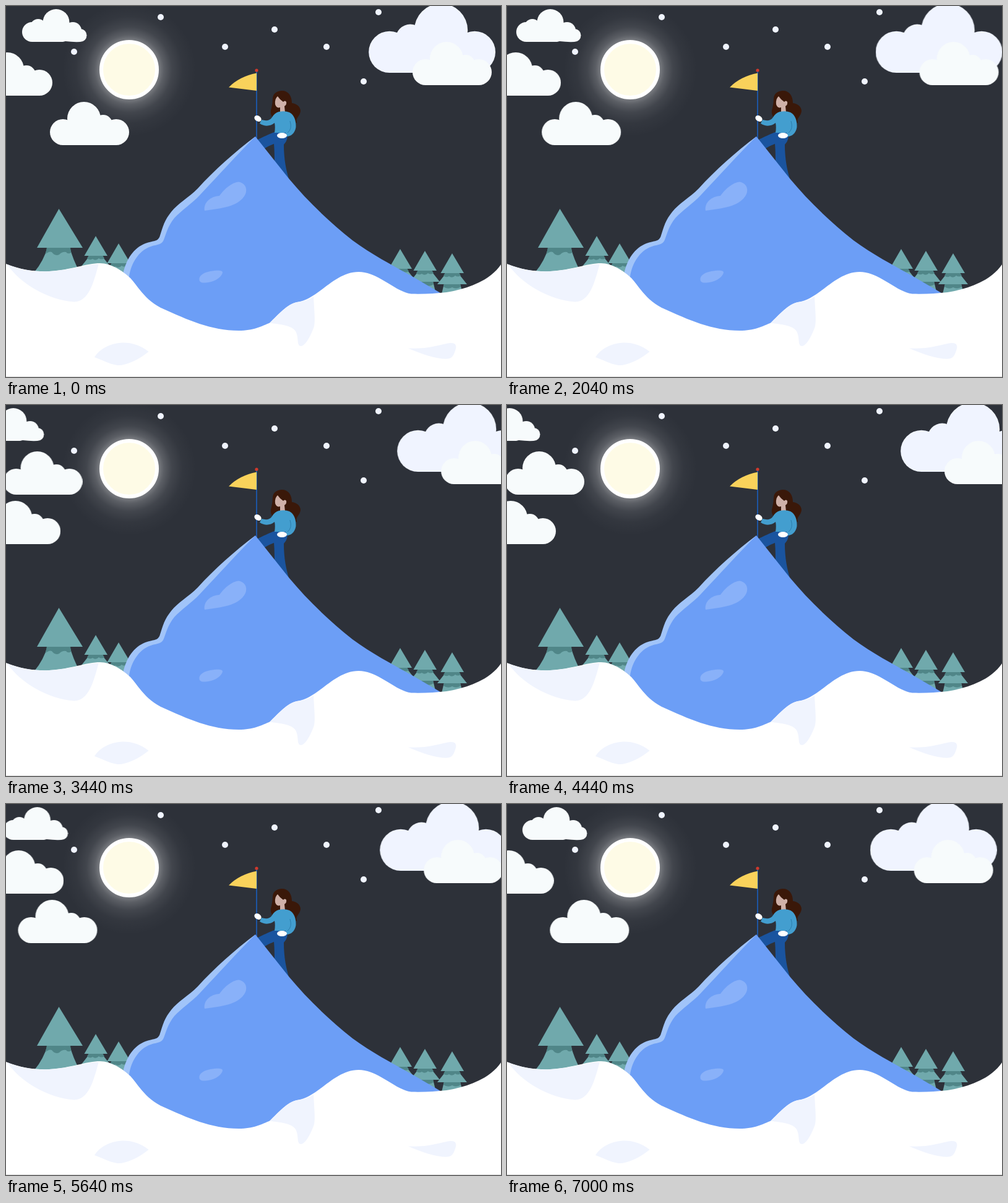
An HTML page that plays this animation: 800x600 px, repeating every 7020 ms.

```html
<!DOCTYPE html>
<html lang="en">
<head>
<meta charset="utf-8">
<title>Summit at night</title>
<style>
  html, body { margin: 0; width: 100%; height: 100%; overflow: hidden; background: #2d3139; }
  svg { display: block; width: 100vw; height: 100vh; }

  /* Clouds rest, drift out, then ease home until the loop cuts. */
  .drift { animation: 7020ms linear infinite; }
  .wisp { animation-name: wisp; }
  .left { animation-name: left; }
  .low { animation-name: low; }
  .right { animation-name: right; }

  @keyframes wisp {
    0% { transform: none; }
    23.86% { transform: translateX(0); animation-timing-function: ease; }
    64.46% { transform: translateX(-77px); }
    66.7% { transform: translateX(-77px); animation-timing-function: cubic-bezier(.2725, .0942, .2916, .889); }
    100% { transform: translateX(-1px); }
  }
  @keyframes left {
    0% { transform: none; }
    23.25% { transform: translateX(0); animation-timing-function: ease; }
    56.27% { transform: translateX(50px); }
    65.5% { transform: translateX(50px); animation-timing-function: cubic-bezier(.2725, .0942, .2916, .889); }
    100% { transform: translateX(.6px); }
  }
  @keyframes low {
    0% { transform: none; }
    22.22% { transform: translateX(0); animation-timing-function: cubic-bezier(.33, 0, .4, 1); }
    58.62% { transform: translateX(-120px); }
    67.95% { transform: translateX(-120px); animation-timing-function: cubic-bezier(.2725, .0942, .2916, .889); }
    100% { transform: translateX(-1.5px); }
  }
  @keyframes right {
    0% { transform: none; }
    23.09% { transform: translateX(0); animation-timing-function: ease; }
    62.32% { transform: translateX(50px); }
    65.38% { transform: translateX(50px); animation-timing-function: cubic-bezier(.2725, .0942, .2916, .889); }
    100% { transform: translateX(.6px); }
  }
</style>
</head>
<body>
<svg viewBox="0 0 800 600" preserveAspectRatio="none">
  <defs>
    <radialGradient id="glow" gradientUnits="userSpaceOnUse" cx="199" cy="103" r="108">
      <stop offset=".42" stop-color="#fff" stop-opacity=".4"/>
      <stop offset=".52" stop-color="#fff" stop-opacity=".22"/>
      <stop offset=".64" stop-color="#fff" stop-opacity=".1"/>
      <stop offset=".8" stop-color="#fff" stop-opacity=".03"/>
      <stop offset="1" stop-color="#fff" stop-opacity="0"/>
    </radialGradient>
    <g id="cloud">
      <circle cx="92" cy="204" r="21"/>
      <circle cx="126" cy="182" r="27"/>
      <circle cx="157" cy="191" r="15"/>
      <circle cx="178" cy="204" r="21"/>
      <path d="M92 187H178V225H92Z"/>
    </g>
    <g id="tree">
      <path d="M-9 31H9L24 50H-24Z M-13 49H13L18 70H-18Z" fill="#70a9ac"/>
      <path d="M-11 31H11L14 36Q9 39 5 36Q0 41 -5 37Q-10 40 -14 36Z M-13 50H13L14 54Q7 59 0 55Q-7 59 -14 54Z" fill="#508688"/>
      <path d="M0 0L19 32H-18.5Z" fill="#70a9ac"/>
    </g>
  </defs>

  <rect width="800" height="600" fill="#2d3139"/>

  <g fill="#f0f4ff">
    <circle cx="250" cy="18" r="5"/>
    <circle cx="434" cy="38" r="5"/>
    <circle cx="354" cy="66" r="5"/>
    <circle cx="518" cy="66" r="5"/>
    <circle cx="602" cy="10" r="5"/>
    <circle cx="578" cy="122" r="5"/>
    <circle cx="110" cy="74" r="5"/>
  </g>

  <circle cx="199" cy="103" r="108" fill="url(#glow)"/>
  <circle cx="199" cy="103" r="45" fill="#fefbe6" stroke="#fff" stroke-width="6"/>

  <g fill="#f7fbfc">
    <g class="drift wisp">
      <circle cx="42" cy="42" r="16"/>
      <circle cx="52" cy="34" r="13"/>
      <circle cx="81" cy="26.5" r="21.5"/>
      <circle cx="108" cy="40" r="14"/>
      <circle cx="120" cy="47.5" r="10.5"/>
      <path d="M42 30H108L120 58Q108 58.5 96 57L92 58H42Z"/>
    </g>
    <g class="drift left"><use href="#cloud" x="-124" y="-80"/></g>
    <g class="drift low"><use href="#cloud"/></g>
    <g class="drift right">
      <use href="#cloud" transform="matrix(-1.6 0 0 1.6 904.6 -252)" fill="#f0f4ff"/>
      <use href="#cloud" x="586" y="-97"/>
    </g>
  </g>

  <!-- trees -->
  <path d="M67 390H103Q108 410 119 430H46Q61 412 67 390Z" fill="#70a9ac"/>
  <path d="M66 390H104L105 399Q100 402 97 398Q91 397 86 402Q79 405 74 398Q70 396 64 401Z" fill="#508688"/>
  <path d="M85.500 328L124 391H50Z" fill="#70a9ac"/>
  <use href="#tree" x="145" y="372"/>
  <use href="#tree" x="182" y="384"/>
  <use href="#tree" x="637" y="393"/>
  <use href="#tree" x="677" y="396"/>
  <use href="#tree" x="721" y="400"/>

  <!-- climber -->
  <path d="M405 106V214" stroke="#1d55a3" stroke-width="2"/>
  <path d="M405 108.500Q377 114 360 131.500L405 137Z" fill="#f9d25b"/>
  <circle cx="405" cy="104" r="2.600" fill="#d0392c"/>
  <path d="M437 203C426 206 414 213 405 217L415 232C423 227 430 224 433 223C434 234 434 246 434 254L458 282C453 267 449 248 449 224C454 219 456 212 454 205Z" fill="#1a549f"/>
  <path d="M431 150C431 142 438 137 446 137C456 137 462 145 462 157C470 158 476 163 476 170C475 179 467 181 470 189C458 188 452 182 450 174L436 181C427 181 427 171 429 165Q431 157 431 150Z" fill="#3a1809"/>
  <path d="M439 146Q443 152 448 155Q451 152 453 155Q454 160 450 162L451 172H443V164Q437 166 435 159Q434 150 439 146Z" fill="#cfb1a9"/>
  <path d="M441 171Q451 169 458 172C466 176 469 186 468.500 196C467 206 460 211 454 211L452 205H434C435 199 435 193 434 189C428 194 419 196 410 190L413 184C420 186 426 186 430 180Q434 173 441 171Z" fill="#439ecf"/>
  <path d="M459 186Q463 199 455 205" fill="none" stroke="#2c7dac" stroke-width="1"/>
  <ellipse cx="407" cy="182" rx="6" ry="4.500" transform="rotate(32 407 182)" fill="#fff"/>
  <ellipse cx="446" cy="209.500" rx="8" ry="4.500" fill="#fff"/>

  <!-- mountain -->
  <path d="M403 211C370 236 336 266 310 295C294 311 278 319 267 333C255 348 253 359 249 371C246 382 238 379 225 384C207 391 194 409 189 434L210 460L300 360Z" fill="#a1c4f9"/>
  <path d="M403 211L457 279C487 315 521 348 560 379C590 401 622 418 656 437L702 464L660 490L430 535H300L190 450L199 438C201 420 212 399 229 391C241 385 251 388 255 378C259 368 261 357 272 343C285 329 299 321 314 305C345 272 371 243 403 211Z" fill="#6c9ef6"/>
  <g fill="#89b1f9">
    <path d="M321 331C319 318 330 308 345 307C352 297 365 285 376 284.500C390 287 391 301 384 309C373 324 350 327 321 331Z"/>
    <path d="M313 445C310 436 320 431 330 429C342 427 350 427 350 431C348 440 335 447 322 447.500Q315 448 313 445Z"/>
  </g>

  <!-- snow -->
  <path d="M0 417C24 427 48 430 70 429C105 427 130 416 152 416C170 416 188 428 201 440C215 456 225 475 250 488C290 506 330 525 376 525C400 525 413 518 427 512C440 499 455 482 470 479C504 475 530 430 570 430C602 430 630 463 655 465.500C676 466 694 465 712 463C750 457 784 442 800 418V600H0Z" fill="#fff"/>
  <g fill="#f0f4fe">
    <path d="M2 418C25 427 48 430 70 429C105 427 130 418 150 417C143 440 136 478 110 478.500C72 476 25 452 2 418Z"/>
    <path d="M426 512.500C440 499 455 482 470 479Q485 478 497 470C498 490 500 508 498 518C492 535 484 549 477 550C469 550 474 537 468 526C462 516 442 515 426 512.500Z"/>
    <path d="M143 568C158 544 200 534 230.500 559C212 574 192 582 180 581C166 579 155 572 143 568Z"/>
    <path d="M650 553.500C680 555 698 549 712 546C728 542 729 550 726 557C722 571 717 571 705 570.500C685 568 665 560 650 553.500Z"/>
  </g>
  <path d="M0 599.500H800" stroke="#dadada"/>
</svg>
</body>
</html>
```
